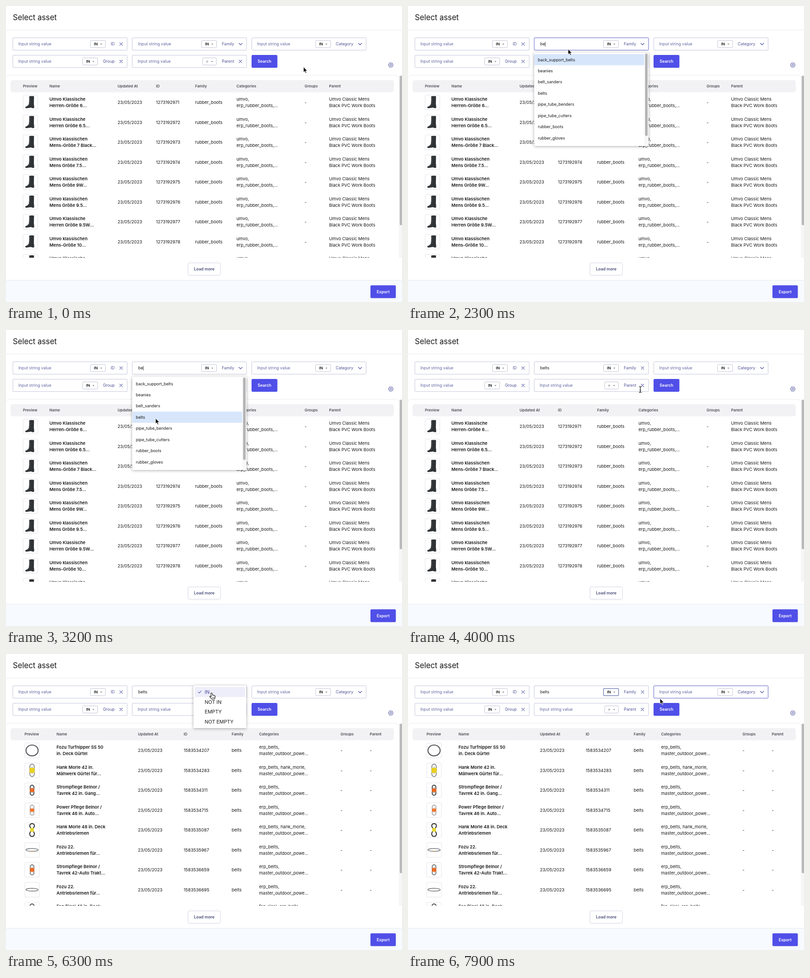
Animation, 866 px wide and 647 px high, one loop 8 s. Source, as an HTML page:

```html
<!DOCTYPE html>
<html lang="en">
<head>
<meta charset="utf-8">
<title>Select asset</title>
<style>
html, body { margin: 0; width: 100%; height: 100%; overflow: hidden; background: #fff; }
svg { display: block; width: 866px; height: 647px; font-family: Inter, sans-serif; cursor: default; }
.line { fill: none; stroke: #5a60a6; stroke-width: 1.1; stroke-linecap: round; stroke-linejoin: round; }
.field { fill: #fff; stroke: #c6c8da; }
.hover { stroke: #5c61c4; }
.pick { fill: #fff; stroke: #c3c5d6; }
.focus { stroke: #7982b8; stroke-width: 1.5; }
.pop { fill: #fff; filter: drop-shadow(0 1px 3px #0005); }
</style>
</head>
<body>
<svg id="stage" viewBox="0 0 866 647"></svg>
<script>
const stage = document.getElementById('stage');
const INK = '#17181b', BLUE = '#6066a2', LABEL = '#505596';

const rect = (x, y, w, h, attrs) => `<rect x="${x}" y="${y}" width="${w}" height="${h}" ${attrs}/>`;
const path = (d, attrs) => `<path d="${d}" ${attrs}/>`;
// y is the middle of the capitals
const text = (x, y, str, size = 9.5, fill = INK, weight = 400, more = '') =>
  `<text x="${x}" y="${y + size * .364}" font-size="${size}" fill="${fill}" font-weight="${weight}" ${more}>${str}</text>`;
const centred = 'text-anchor="middle"';
const cross = (x, y) => path(`M${x - 3} ${y - 3}l6 6m0 -6l-6 6`, 'class="line"');
const chevron = (x, y) => path(`M${x - 3.5} ${y - 1.7}l3.5 3.5 3.5 -3.5`, 'class="line" style="stroke-width:1.4"');

function button(x, y, w, label, id = '') {
  return rect(x, y, w, 28, `rx="2.5" fill="#504fe8" id="${id}"`) +
    text(x + w / 2, y + 14, label, 8.84, '#fff', 600, centred);
}

function field({ x, y, name, nameX, pickX, pickW = 33, op = 'IN', hintX = x + 12, icon = cross, id = '' }) {
  const c = y + 13.7, faint = op === '=';
  return rect(x, y, 250, 27, `class="field" rx="1" id="${id}Box"`) +
    text(hintX, c, 'Input string value', 8.84, BLUE, 400, `id="${id}Hint"`) +
    rect(pickX, c - 7.8, pickW, 15.6, `class="pick" rx="2" id="${id}Pick"`) +
    text(pickX + (faint ? 10 : 12), c, op, 8.2, faint ? '#777' : INK, 600, centred) +
    path(`M${pickX + pickW - 11.5} ${c - .8}h4.4l-2.2 2.3z`, 'fill="#777"') +
    text(nameX, c, name, 8.84, LABEL) +
    `<g id="${id}Icon">${icon(x + 236.7, c)}</g>`;
}

const boot = path('M-2.8 -13.3Q2 -14.5 7.8 -13.6L7.4 3Q8.4 8 8 12.5H3L1.8 11.3L-8.5 12.8Q-12 12.6 -11.2 9.8Q-5.8 8 -3.6 4Q-2.4 -2 -2.8 -13.3Z', 'fill="#303336"') +
  path('M-1 -11L-1 1Q-2 6 -6 9.3', 'fill="none" stroke="#53575a" stroke-width=".8"');
const ring = (rx, ry, color, w) => `<ellipse rx="${rx}" ry="${ry}" fill="none" stroke="${color}" stroke-width="${w}"/>`;
const hoop = ring(13.3, 11.8, '#3a3c40', 2.2) + ring(13.3, 11.8, '#a2a5a7', .6);
const flat = dot => ring(13.5, 3, '#5a5c5f', 1.4) + ring(13.5, 3, '#bbb', .4) +
  (dot ? rect(-1.5, 1.8, 3, 2.2, 'fill="#dd9a45"') : '');
const loop = (color, label, w = 10, h = 24, lh = 10) =>
  rect(-w / 2, -h / 2, w, h, `rx="${w / 2}" fill="none" stroke="${color}" stroke-width="1.9"`) +
  path(`M0 ${-h / 2 + 5}v${h - 10}`, `stroke="${color}" stroke-width="1.2"`) +
  rect(-w / 2 - .6, -lh / 2, w + 1.2, lh, `fill="${label}"`);
const twist = path('M0 -1C-9 -10 -4 -14 0 -14S9 -10 0 -1S-4 14 0 14S9 9 0 -1Z', 'fill="none" stroke="#2c2e30" stroke-width="2"') +
  rect(-4, -4.5, 8, 8, 'fill="#e5d52d"');

// columns: preview, name, date, id, family, categories, groups, parent
function table(id, cols, rows) {
  const heads = ['Preview', 'Name', 'Updated At', 'ID', 'Family', 'Categories', 'Groups', 'Parent'];
  let out = heads.map((h, i) => text(cols[i], 175, h, 8.2, '#4e5056', 600)).join('');
  rows.forEach((row, i) => {
    const y = 210.8 + 43.5 * i, mid = cols[0] + 16.5;
    out += rect(cols[0] + .5, y - 16, 32, 32, 'rx="2" fill="#fff" stroke="#e5e5eb"') +
      `<g transform="translate(${mid} ${y})">${row[0]}</g>`;
    row.slice(1).forEach((cell, c) => {
      const lines = cell.split('|');
      lines.forEach((line, n) => {
        const at = lines.length > 1 ? y - 6.8 + 13.6 * n : y;
        out += text(cols[c + 1], at, line, 9.5, INK, c ? 400 : 600);
      });
    });
  });
  return `<g id="${id}">${out}</g>`;
}

const bootNames = ['Umvo Klassische|Herren-Größe 6...', 'Umvo Klassische|Herren Größe 6.5...', 'Umvo klassischen|Mens-Größe 7 Black...',
  'Umvo klassischen|Mens Größe 7.5...', 'Umvo klassischen|Mens Größe 9W...', 'Umvo klassischen|Mens Größe 9.5...',
  'Umvo Klassische|Herren Größe 9.5W...', 'Umvo klassischen|Mens-Größe 10...', 'Umvo Klassische|Herren Größe 11...'];
const bootRows = bootNames.map((name, i) => [boot, name, '23/05/2023', `${1273192971 + i}`, 'rubber_boots',
  'umvo,|erp_rubber_boots,...', '-', 'Umvo Classic Mens|Black PVC Work Boots']);

const beltRows = [
  [hoop, 'Fozu Turfnipper SS 50|in. Deck Gürtel', 4207],
  [loop('#85888a', '#ecd01e', 9.5, 27, 11), 'Hank Morle 42 in.|Mähwerk Gürtel für...', 4283, 'hank_morle,'],
  [loop('#3c3e40', '#ee6a22', 8, 22, 8), 'Strompflege Belnor /|Tavrek 42 in. Gang...', 4311],
  [loop('#aaa9a8', '#f07832', 8, 22, 7), 'Power Pflege Belnor /|Tavrek 46 in. Auto...', 4715],
  [twist, 'Hank Morle 48 in. Deck|Antriebsriemen', 5087, 'hank_morle,'],
  [flat(true), 'Fozu 22.|Antriebsriemen für...', 5967],
  [loop('#77797b', '#ee6a22', 8, 22, 8), 'Strompflege Belnor /|Tavrek 42-Auto Trakt...', 6659],
  [flat(false), 'Fozu 22.|Antriebsriemen für...', 6695],
  [loop('#4a4643', '#ee6a22', 9, 25, 9), 'Fen Rigol 46 in. Deck|Antriebsriemen', 6711]
].map(([pic, name, num, tag], i) => [pic, name, '23/05/2023', `158353${num}`, 'belts',
  `${i === 8 ? 'fen_rigol, erp_belts,' : 'erp_belts,' + (tag ? ' ' + tag : '')}|master_outdoor_powe...`, '-', '-']);

const options = ['back_support_belts', 'beanies', 'belt_sanders', 'belts', 'pipe_tube_benders',
  'pipe_tube_cutters', 'rubber_boots', 'rubber_gloves'];
const STEP = 24.45;
const list = `<g id="list">${rect(276, 101.5, 250, 204.5, 'class="pop" rx="2"')}
  ${rect(517, 102, 9, 203.5, 'fill="#f7f7f8"')}${rect(518.5, 104, 5.5, 180, 'rx="2.7" fill="#b4b4b6"')}
  ${rect(276.5, 0, 240, STEP, 'id="mark" fill="#d7e6fb"')}
  ${options.map((o, i) => text(284, 117.3 + STEP * i, o, 8.84)).join('')}</g>`;

const menu = `<g id="menu">${rect(410, 69, 115.5, 93, 'class="pop" rx="2"')}
  ${rect(413, 72, 110, 22, 'fill="#eeeefb"')}${path('M420.5 83l2.2 2.3 4.3 -4.6', 'class="line"')}
  ${['IN', 'NOT IN', 'EMPTY', 'NOT EMPTY'].map((o, i) =>
    text(434.5, 83.2 + 21.7 * i, o, 10.7, i ? INK : '#454796')).join('')}</g>`;

const pointers = {
  arrow: path('M0 0V12.2L2.8 9.6L4.8 14L6.8 13.1L4.9 8.9H8.6Z', 'fill="#111" stroke="#fff" stroke-width=".9"'),
  beam: path('M-3 -6.5Q0 -6.5 0 -4.8Q0 -6.5 3 -6.5M0 -5V5M-3 6.5Q0 6.5 0 4.8Q0 6.5 3 6.5M-1.5 1.5h3', 'fill="none" stroke="#111" stroke-width="1.2"'),
  hand: path('M-1.5 .8Q0 -.8 1.4 .8L2 5Q3.6 4 4.4 5.4Q6 4.7 6.6 6.2Q8 6 8 7.5Q8.2 11 6.6 13.5H.2Q-1.5 10.5 -4 8.5Q-4.3 6.5 -2.3 7.3L-.7 8.4Z', 'fill="#fff" stroke="#111" stroke-width="1.1" stroke-linejoin="round"') +
    path('M2.2 9v2.7M4.1 9v2.7M6 9v2.7', 'stroke="#111" stroke-width=".7"')
};

stage.innerHTML = `
  <defs><clipPath id="view">${rect(0, 151, 860, 399.3, '')}</clipPath></defs>
  ${text(15, 25, 'Select asset', 16.7, '#17181a')}
  ${path('M0 52.5H866M0 156Q2 151.5 8 151.5H851Q857 151.5 859 156', 'fill="none" stroke="#ececf0"')}
  ${field({ x: 15, y: 69.5, name: 'ID', nameX: 229, pickX: 184.5, id: 'ident' })}
  ${field({ x: 276, y: 69.5, name: 'Family', nameX: 472, pickX: 427.5, hintX: 289, icon: chevron, id: 'family' })}
  ${field({ x: 537.5, y: 69.5, name: 'Category', nameX: 721, pickX: 677, icon: chevron, id: 'category' })}
  ${field({ x: 15, y: 107.5, name: 'Group', nameX: 212, pickX: 167.5, id: 'group' })}
  ${field({ x: 276, y: 107.5, name: 'Parent', nameX: 472, pickX: 430, pickW: 30, op: '=', id: 'parent' })}
  ${text(289, 83.2, '', 8.84, INK, 400, 'id="value"')}
  ${path('M0 78.5v10', 'id="caret" stroke="#222" stroke-width=".9"')}
  ${button(537, 107, 56.5, 'Search', 'search')}
  ${path('M838.9 124.5h5.2l2.6 4.5l-2.6 4.5h-5.2l-2.6 -4.5z', 'class="line"')}
  <circle cx="841.5" cy="129" r="1.9" class="line"/>
  ${rect(859, 152, 7, 398, 'fill="#f6f6f7"')}
  ${rect(861, 152.5, 6, 326.5, 'rx="2" fill="#b9b9bb"')}
  ${rect(10, 162, 838, 26.5, 'rx="5" fill="#f2f2f4"')}
  <g clip-path="url(#view)">
    ${table('boots', [37, 95, 244, 328, 413.5, 504, 653, 706.5], bootRows)}
    ${table('belts', [40.5, 110.5, 288.5, 388.5, 493.5, 553.5, 731.5, 795.5], beltRows)}
  </g>
  ${rect(398, 561.5, 71, 27, 'rx="2.5" fill="#fff" stroke="#d3d4e2"')}
  ${text(433.5, 575.2, 'Load more', 8.84, '#4b4e7c', 600, centred)}
  ${rect(0, 600, 866, 47, 'fill="#f7fafe"')}${path('M0 599.5H866', 'stroke="#e4e7ec"')}
  ${button(797, 610.5, 55.5, 'Export')}
  ${list}${menu}
  <g id="pointer">${Object.entries(pointers).map(([k, p]) => `<g id="${k}">${p}</g>`).join('')}</g>`;

const $ = id => document.getElementById(id);
const show = (id, on) => $(id).setAttribute('visibility', on ? 'visible' : 'hidden');
const within = (t, a, b) => t >= a && t < b;

// time, x, y of the pointer's hot spot
const route = [[0, 650.5, 133], [200, 650.5, 133], [900, 350, 94], [2400, 350, 94], [3000, 327, 193], [3600, 327, 193],
  [4000, 508, 130], [4300, 568.5, 117], [5600, 568.5, 117], [6000, 449.5, 85], [7400, 449.5, 85], [7900, 551, 97], [8000, 551, 97]];

function place(t) {
  const i = route.findIndex(p => p[0] > t);
  const [t0, x0, y0] = route[i - 1], [t1, x1, y1] = route[i];
  const u = (t - t0) / (t1 - t0), k = u * u * (3 - 2 * u);
  return [x0 + (x1 - x0) * k, y0 + (y1 - y0) * k];
}

let picked;
function draw(t) {
  const [x, y] = place(t);
  $('pointer').setAttribute('transform', `translate(${x} ${y})`);
  const kind = within(t, 3900, 4150) ? 'beam' : within(t, 4150, 5700) || within(t, 5900, 7500) ? 'hand' : 'arrow';
  Object.keys(pointers).forEach(k => show(k, k === kind));

  const value = t < 1700 ? '' : t < 1900 ? 'b' : t < 3700 ? 'be' : 'belts';
  $('value').textContent = value;
  show('familyHint', !value);
  show('caret', within(t, 1100, 3700));
  $('caret').setAttribute('transform', `translate(${289.5 + $('value').getComputedTextLength()} 0)`);
  if (picked !== t >= 3700) {
    picked = t >= 3700;
    $('familyIcon').innerHTML = (picked ? cross : chevron)(513, 83.2);
  }

  show('list', within(t, 2000, 3700));
  const row = Math.max(0, Math.min(7, Math.floor((y - 105) / STEP)));
  $('mark').setAttribute('y', 105 + STEP * row);

  const menuOpen = within(t, 6200, 7500);
  const over = (left, right) => !menuOpen && x > left && x < right && y > 69 && y < 97.5;
  $('familyBox').classList.toggle('hover', over(276, 526));
  $('categoryBox').classList.toggle('hover', over(537, 787));
  $('familyPick').classList.toggle('focus', t >= 6200);
  const onSearch = x > 537 && x < 594 && y > 107 && y < 135 && within(t, 4000, 6000);
  $('search').setAttribute('fill', onSearch ? '#30269a' : '#504fe8');

  show('boots', t < 5800);
  show('belts', t >= 5800);
  show('menu', menuOpen);
}

function tick(now) {
  draw(Math.floor(now % 8000 / 100) * 100);
  requestAnimationFrame(tick);
}
requestAnimationFrame(tick);
</script>
</body>
</html>
```
